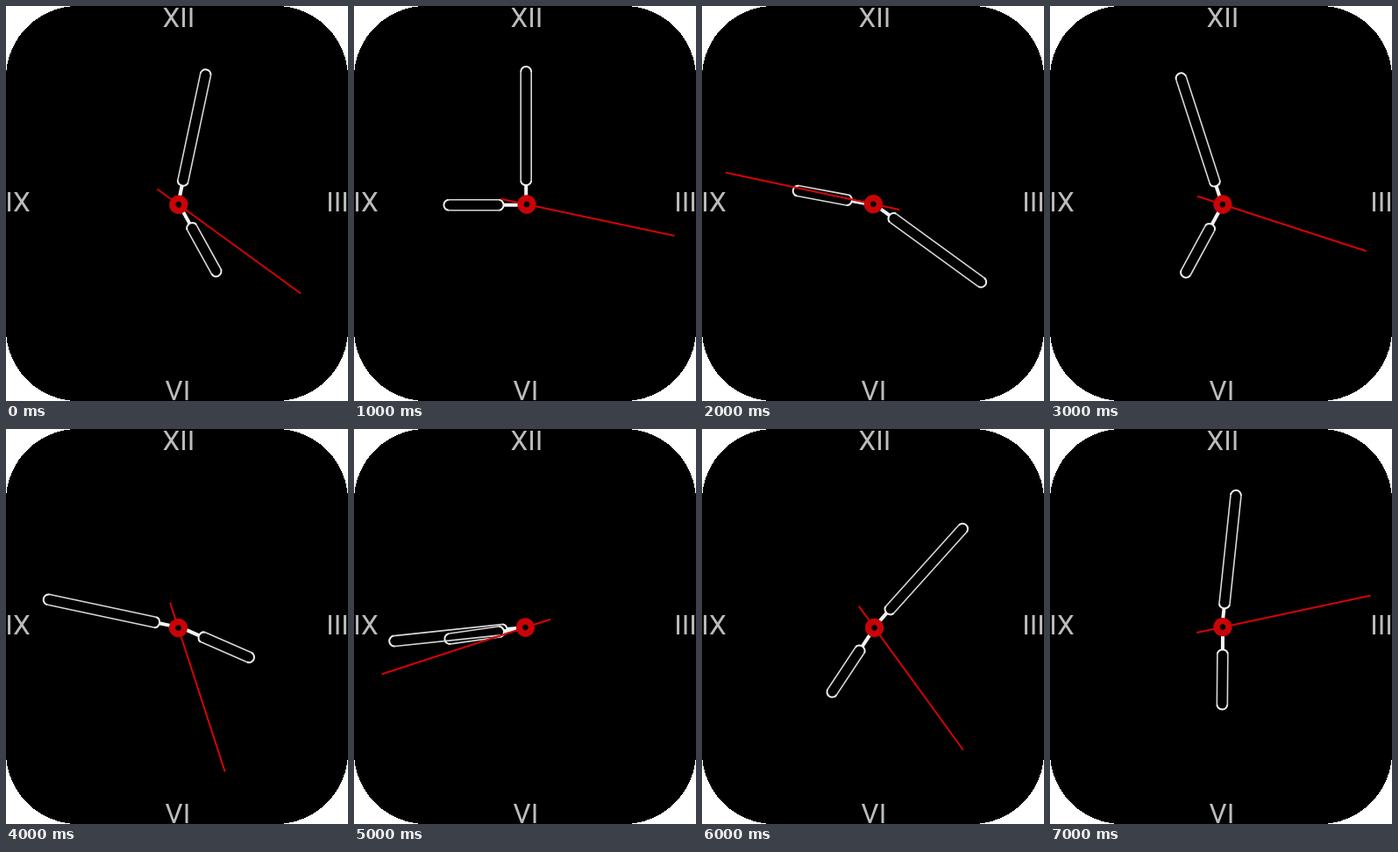
An HTML page for the animation above (8 s loop, 390 by 450 pixels).

```html
<!DOCTYPE html>
<html lang="en">
<head>
<meta charset="utf-8">
<title>Clock face</title>
<style>
  html, body { margin: 0; width: 100%; height: 100%; overflow: hidden; background: #fff; }
  svg { display: block; width: 390px; height: 450px; }
  text { font: 31.5px Roboto, sans-serif; fill: #bcbcbc; }
  .hand path { fill: none; stroke: #f0f0f0; stroke-width: 2; }
  .hand .sides { stroke: #d8d8d8; stroke-width: 1.6; }
  .hand .stem { stroke: #f4f4f4; stroke-width: 4; }
</style>
</head>
<body>
<svg viewBox="0 0 390 450">
  <rect width="390" height="450" rx="82" shape-rendering="crispEdges"/>
  <text x="178.4" y="24">XII</text>
  <text x="365.2" y="234">III</text>
  <text x="181.6" y="449">VI</text>
  <text x="-0.8" y="234">IX</text>
  <g transform="translate(196.2 225.8)">
    <g id="hour" class="hand">
      <g transform="translate(-0.9 0)">
        <path class="stem" d="M0-8V-26"/>
        <path class="sides" d="M-6-31V-87.8M6-31V-87.8"/>
        <path d="M-6-87.8a6 6 0 0 1 12 0M-6-31q0 4.5 6 5.5q6-1 6-5.5"/>
      </g>
    </g>
    <g id="minute" class="hand">
      <path class="stem" d="M0-8V-22"/>
      <path class="sides" d="M-6-27V-150.8M6-27V-150.8"/>
      <path d="M-6-150.8a6 6 0 0 1 12 0M-6-27q0 4.5 6 5.5q6-1 6-5.5"/>
    </g>
    <g id="second">
      <line y1="29.5" y2="-173" stroke="#d40404" stroke-width="2"/>
      <circle cy="-0.8" r="7" stroke="#c80408" stroke-width="7.4"/>
    </g>
  </g>
</svg>
<script>
  const STEP = 1000;
  // hour, minute, second shown during each step
  const times = [
    [5, 2, 21], [9, 0, 17], [9, 21, 47], [6, 57, 18],
    [3, 47, 27], [8, 44, 42], [7, 7, 24], [6, 1, 13]
  ];

  const turn = (id, deg) =>
    document.getElementById(id).setAttribute("transform", `rotate(${deg})`);

  const start = performance.now();

  function draw(now) {
    const i = Math.floor(Math.max(0, now - start) / STEP) % times.length;
    const [h, m, s] = times[i];
    turn("hour", h * 30 + m / 2);
    turn("minute", m * 6);
    turn("second", s * 6);
    requestAnimationFrame(draw);
  }
  draw(start);
</script>
</body>
</html>
```
